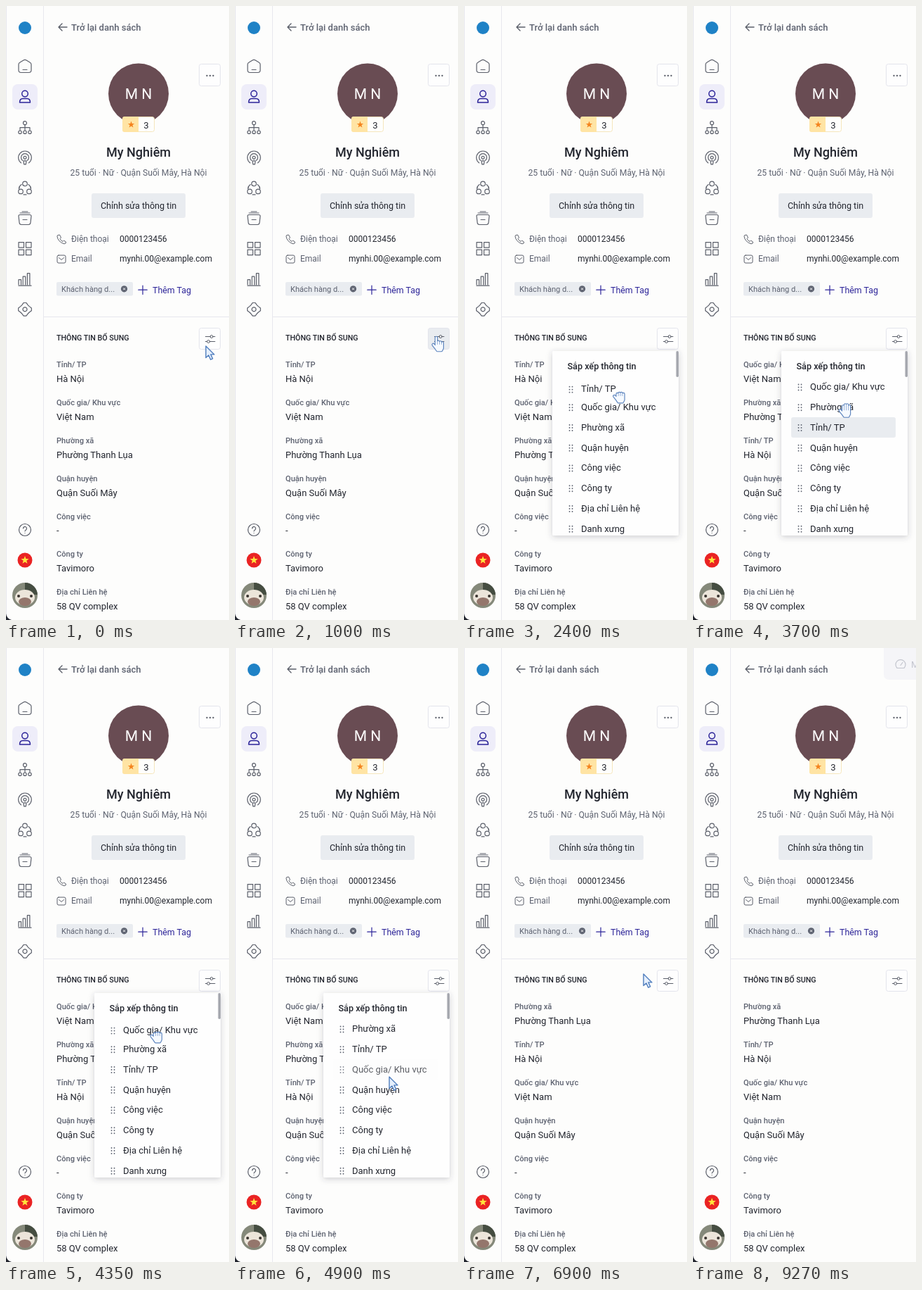
These frames come from a looping animation (318 px wide and 872 px high, 9.32 s). An HTML page:

```html
<!DOCTYPE html>
<html lang="vi">
<head>
<meta charset="utf-8">
<title>Sắp xếp thông tin</title>
<style>
html, body { margin: 0; width: 100%; height: 100%; overflow: hidden; background: #fdfdfc; }
svg { display: block; position: absolute; left: 0; top: 0; font: 13px Roboto, "Noto Sans", sans-serif; fill: #22252e; }
.icon { fill: none; stroke: #5b5f6a; stroke-width: 1.2; stroke-linecap: round; stroke-linejoin: round; }
.thin { stroke-width: 1; }
.active { stroke: #2d2599; stroke-width: 1.5; }
.box { fill: #fefefe; stroke: #e3e4ec; }
.fill { fill: #e9ecf0; }
.line { stroke: #e7e7ee; }
.mid { text-anchor: middle; }
.bold { font-weight: 500; }
.gray { fill: #5d6270; }
.body { font-size: 12px; }
.small { font-size: 11.1px; }
.indigo { fill: #2d2599; }
</style>
</head>
<body>
<svg id="stage" width="318" height="872" viewBox="0 0 318 872">
  <defs>
    <clipPath id="photoClip"><circle cx="27" cy="837" r="18"/></clipPath>
    <clipPath id="menuClip"><rect x="126" y="490" width="180" height="262"/></clipPath>
    <filter id="shadow" x="-15%" y="-10%" width="130%" height="120%">
      <feDropShadow dx="0" dy="2" stdDeviation="4" flood-color="#3a3d50" flood-opacity=".25"/>
    </filter>
    <path id="star"/>
  </defs>

  <path class="line" d="M.5 0V866M53.5 0V872M54 441.5H318"/>
  <path d="M0 863Q1 870 8 872H0Z"/>
  <circle cx="27" cy="31" r="9" fill="#1f82c6"/>
  <rect x="9" y="111" width="36" height="36" rx="8" fill="#eeedf9"/>
  <g id="sidebar" class="icon"></g>

  <g class="icon">
    <circle cx="27" cy="744" r="8.5"/>
    <path d="M24.500 742a2.500 2.500 0 1 1 4 2Q27 745 27 746M27 748.500v.1"/>
    <path d="M87 30H75l5-5m-5 5 5 5" stroke-width="1.4"/>
    <path class="thin" d="M74 325.500l2.500-.5 2 4-1.500 1.500q1 2.500 4 4l1.500-1.500 3 2-.5 2q-1 1-3 .5-8-3-9-10Z"/>
    <rect class="thin" x="73" y="354" width="12" height="11" rx="2"/>
    <path class="thin" d="M75.500 357.500l3.500 3 3.500-3"/>
  </g>

  <circle cx="27" cy="787" r="10.5" fill="#ea2323"/>
  <use href="#star" transform="translate(27 787) scale(6)" fill="#ffe43c"/>
  <g clip-path="url(#photoClip)">
    <rect x="9" y="819" width="36" height="36" fill="#85897a"/>
    <path d="M27 819H45V836H27Z" fill="#454d41"/>
    <ellipse cx="27" cy="840" rx="14" ry="11" fill="#ece5da"/>
    <ellipse cx="27" cy="846" rx="9" ry="6" fill="#94766c"/>
    <circle cx="18" cy="838" r="2" fill="#38332f"/><circle cx="36" cy="838" r="2" fill="#38332f"/>
  </g>

  <rect class="box" x="275.500" y="82.500" width="30" height="31" rx="3"/>
  <path class="icon" style="stroke-width:2.300" d="M286.500 99h0M291 99h0M295.500 99h0"/>
  <circle cx="189" cy="124.500" r="43" fill="#694c53"/>
  <rect x="166.500" y="157.500" width="45" height="21" rx="3" fill="#fefefc" stroke="#f5e6bd"/>
  <path d="M169 157H189V179H169Q166 179 166 176V160Q166 157 169 157Z" fill="#ffe4a4"/>
  <use href="#star" transform="translate(178.500 168.500) scale(5)" fill="#f4831d"/>
  <rect class="fill" x="122" y="266" width="134" height="35" rx="3"/>
  <rect class="fill" x="72" y="392" width="109" height="19.500" rx="2"/>
  <circle cx="168.500" cy="401.800" r="4.600" fill="#5d6270"/>
  <path d="M167 400.300l3 3m0-3-3 3" stroke="#fff"/>
  <path class="icon" style="stroke:#2d2599" d="M195 397v12.400M188.800 403.200h12.400"/>

  <rect class="box" id="filterBox" x="275.500" y="457.500" width="30" height="30" rx="3"/>
  <g class="icon thin">
    <path d="M284.500 469.500h6.700m4 0h2.800M284.500 476.500h2.200m4 0h7.300"/>
    <circle cx="293.200" cy="469.500" r="2"/><circle cx="288.700" cy="476.500" r="2"/>
  </g>

  <text class="bold gray" x="93" y="34.500">Trở lại danh sách</text>
  <text class="mid" x="189" y="132" style="font-size:21px;fill:#fff">M N</text>
  <text class="mid" x="200" y="173.500">3</text>
  <text class="mid bold" x="189" y="214" style="font-size:18px">My Nghiêm</text>
  <text class="mid gray" x="189" y="241" style="font-size:12.200px">25 tuổi · Nữ · Quận Suối Mây, Hà Nội</text>
  <text class="mid" x="189" y="288.300" style="font-size:12.500px">Chỉnh sửa thông tin</text>
  <text class="body gray" x="93" y="335.300">Điện thoại</text>
  <text class="body" x="162" y="335.300">0000123456</text>
  <text class="body gray" x="93" y="363.300">Email</text>
  <text class="body" x="162" y="363.300">mynhi.00@example.com</text>
  <text class="small gray" x="79" y="405.500">Khách hàng d...</text>
  <text class="indigo" x="209" y="407.500" style="font-size:12.400px">Thêm Tag</text>
  <text class="bold" x="72" y="475" style="font-size:10.700px">THÔNG TIN BỔ SUNG</text>
  <g id="profile"></g>

  <g id="menu">
    <rect x="126" y="490" width="180" height="262" rx="2" fill="#fefefe" filter="url(#shadow)"/>
    <rect id="glow" class="fill" x="140" y="584" width="149" height="29" rx="3"/>
    <text class="bold" x="147.500" y="516" style="font-size:12.600px">Sắp xếp thông tin</text>
    <g id="rows" clip-path="url(#menuClip)"></g>
    <rect x="302.500" y="490" width="3.500" height="37" rx="1.700" fill="#a6a8af"/>
  </g>

  <g id="toast">
    <path d="M272 0H318V45H280Q272 45 272 37Z" fill="#f5f5f8"/>
    <path class="icon" style="stroke:#c3c5ce" d="M291 28.500a7 7 0 1 1 10 0ZM296 24.500l3-4"/>
    <text x="311" y="27.500" style="fill:#c3c5ce">M</text>
  </g>
  <g id="cursor"></g>
</svg>
<script>
const LOOP = 9320;
const $ = id => document.getElementById(id);

function add(parent, tag, attrs, text = '') {
  const el = document.createElementNS('http://www.w3.org/2000/svg', tag);
  for (const key in attrs) el.setAttribute(key, attrs[key]);
  el.textContent = text;
  return parent.appendChild(el);
}

// Closed outline around the origin, its radius given per corner.
function ring(n, radius, turn = 0) {
  const points = Array.from({ length: n }, (_, i) => {
    const a = (i + turn) / n * 2 * Math.PI - Math.PI / 2, r = radius(i);
    return `${(r * Math.cos(a)).toFixed(2)} ${(r * Math.sin(a)).toFixed(2)}`;
  });
  return `M${points.join('L')}Z`;
}
const circle = (x, y, r) => `M${x - r} ${y}a${r} ${r} 0 1 1 ${2 * r} 0a${r} ${r} 0 1 1 ${-2 * r} 0`;
const square = (x, y, s) => `M${x} ${y}h${s}v${s}h${-s}Z`;
const bar = (x, h) => `M${x} 8v${-h}h3.500v${h}`;

$('star').setAttribute('d', ring(10, i => i % 2 ? .4 : 1));

const icons = {
  home: 'M-9-3q0-2 2-3l5-3q2-1.200 4 0l5 3q2 1 2 3v8q0 3.500-3.500 3.500h-11q-3.500 0-3.500-3.500ZM-3 4.500h6',
  person: circle(0, -4.500, 4.300) + 'M-7.500 8q0-5.500 4.500-5.500h6q4.500 0 4.500 5.500Z',
  tree: circle(0, -6, 2.500) + [-7, 0, 7].map(x => circle(x, 7, 2.200)).join('') + 'M0-3.500v8M-7 4.500v-4h14v4',
  signal: circle(0, 0, 2) + 'M-5.500 7.500a9.300 9.300 0 1 1 11 0M-3.500 4a5.500 5.500 0 1 1 7 0M-2 4.500h4l-.7 5h-2.600Z',
  people: [[0, -6], [-6, 5], [6, 5]].map(p => circle(...p, 3.300)).join('') + 'M-5-5q-3.500 2.500-3.500 6M5-5q3.500 2.500 3.500 6M-2 9.500h4',
  archive: 'M-9-3q0-2 2-2h14q2 0 2 2l-1 9q-.3 3-3 3h-10q-2.700 0-3-3ZM-7-7.500h14M-4-9.500h8M-3 2h6',
  grid: [-9, 1.500].flatMap(x => [-9, 1.500].map(y => square(x, y, 7.500))).join(''),
  chart: [0, 1, 2].map(i => bar(-9 + 6.200 * i, 7 + 4.500 * i)).join('') + 'M-9 9.500h18',
  gear: circle(0, 0, 3) + ring(16, i => i % 4 < 2 ? 9.500 : 7.500, -.5),
};
Object.keys(icons).forEach((name, i) => add($('sidebar'), 'path', {
  d: icons[name], transform: `translate(27 ${86 + 43.100 * i})`, class: name === 'person' ? 'active' : '',
}));

const fields = [
  ['Tỉnh/ TP', 'Hà Nội'],
  ['Quốc gia/ Khu vực', 'Việt Nam'],
  ['Phường xã', 'Phường Thanh Lụa'],
  ['Quận huyện', 'Quận Suối Mây'],
  ['Công việc', '-'],
  ['Công ty', 'Tavimoro'],
  ['Địa chỉ Liên hệ', '58 QV complex'],
];
const lines = fields.map((_, i) => {
  const y = 513.300 + 53.800 * i;
  return [
    add($('profile'), 'text', { x: 72, y, class: 'small bold gray' }),
    add($('profile'), 'text', { x: 72, y: y + 20.800 }),
  ];
});

const rowY = slot => 541 + 28.750 * slot;
const place = (el, x, y) => el.setAttribute('transform', `translate(${x} ${y})`);
const rows = [...fields.map(f => f[0]), 'Danh xưng'].map((name, i) => {
  const row = add($('rows'), 'g');
  for (const x of [150.500, 154.500])
    for (const y of [-4, 0, 4]) add(row, 'circle', { cx: x, cy: y + .500, r: .9, class: 'gray' });
  add(row, 'text', { x: 167, y: 4.300 }, name);
  place(row, 0, rowY(i));
  return row;
});

// A hand is drawn twice: wide strokes for the outline, narrow ones inside.
function hand(kind, left, bottom, tops) {
  const fingers = tops.map((top, i) => `M${left + 2.900 * i} ${bottom}V${top}`).join('');
  const d = `M${left} ${bottom}h8.700v4l-1.500 3h-5.500l-2-3l-4-5l4 4Z${fingers}`;
  const g = add($('cursor'), 'g', { 'data-kind': kind, 'stroke-linecap': 'round', 'stroke-linejoin': 'round' });
  for (const [color, width] of [['#5b83bd', 4.600], ['#f6faff', 2.300]])
    add(g, 'path', { d, fill: color, stroke: color, 'stroke-width': width });
}
hand('point', 0, 12, [1, 7, 7.500, 8.500]);
hand('open', -4.300, 2, [-5, -7, -7, -5]);
hand('fist', -4.300, 1, [-3, -4, -4, -3]);
add($('cursor'), 'path', {
  'data-kind': 'arrow', d: 'M0 0V16.500L3.900 13 6.800 19.200 9.700 17.800 6.900 11.900H12Z',
  fill: '#e6f0fd', stroke: '#4f7dbd', 'stroke-width': 1.400, 'stroke-linejoin': 'round',
});

function ramp(t, start, end) {
  const u = Math.min(1, Math.max(0, (t - start) / (end - start)));
  return u * u * (3 - 2 * u);
}
const hold = (t, start, end, fade) => ramp(t, start, start + fade) - ramp(t, end, end + fade);

// Each drag carries the first row to the third place; the profile follows once saved.
const drags = [
  { start: 2310, end: 2950, saved: 3400 },
  { start: 4290, end: 4830, saved: 6900 },
];
const HOVER = [350, 1500], MENU = [1300, 6600], EXIT = 7150, TOAST = 9220;

const stops = [
  { start: 70, end: 800, x: 287, y: 470 },
  { start: 1400, end: 2130, x: 223, y: 551 },
  { ...drags[0], x: 222, y: 608 },
  { start: 3300, end: 4020, x: 216, y: 549 },
  { ...drags[1], x: 220, y: 609 },
  { start: MENU[1] - 1, end: MENU[1], x: 256, y: 463 },
  { start: EXIT, end: EXIT + 280, x: 285, y: -24 },
];

function slotsAt(t) {
  let slots = [0, 1, 2];
  for (const { start, end } of drags.filter(d => t > d.start)) {
    const travel = 2 * ramp(t, start, end);
    slots = slots.map(s => s === 0 ? travel : s - ramp(travel, s - .750, s - .250));
  }
  return slots;
}

function cursorKind(t) {
  if (t >= HOVER[0] && t < HOVER[1]) return 'point';
  if (drags.some(d => t > d.start - 100 && t < d.end)) return 'fist';
  return t > 1980 && t < drags[1].end ? 'open' : 'arrow';
}

function draw(t) {
  const order = [0, 1, 2];
  drags.filter(d => t >= d.saved).forEach(() => order.push(order.shift()));
  lines.forEach((line, i) => line.forEach((el, k) => el.textContent = fields[order[i] ?? i][k]));

  slotsAt(t).forEach((slot, i) => place(rows[i], 0, rowY(slot)));
  drags.forEach(({ end }, i) => rows[i].setAttribute('opacity', 1 - .3 * hold(t, end - 100, end + 50, 100)));
  $('glow').setAttribute('opacity', Math.max(...drags.map(({ end }) => hold(t, end + 50, end + 1050, 120))));
  $('menu').setAttribute('opacity', t < MENU[1] ? ramp(t, MENU[0], MENU[0] + 150) : 0);
  $('filterBox').style.fill = t >= HOVER[0] && t < HOVER[1] ? '#e9ecf0' : '';
  $('toast').setAttribute('opacity', ramp(t, TOAST - 50, TOAST + 50));

  let x = 285, y = 483;
  for (const stop of stops) {
    const u = ramp(t, stop.start, stop.end);
    x += (stop.x - x) * u;
    y += (stop.y - y) * u;
  }
  place($('cursor'), x, y);
  const kind = cursorKind(t);
  for (const el of $('cursor').children) el.style.display = el.dataset.kind === kind ? '' : 'none';
}

const begin = performance.now();
function tick() {
  draw((performance.now() - begin) % LOOP);
  requestAnimationFrame(tick);
}
tick();
</script>
</body>
</html>
```
